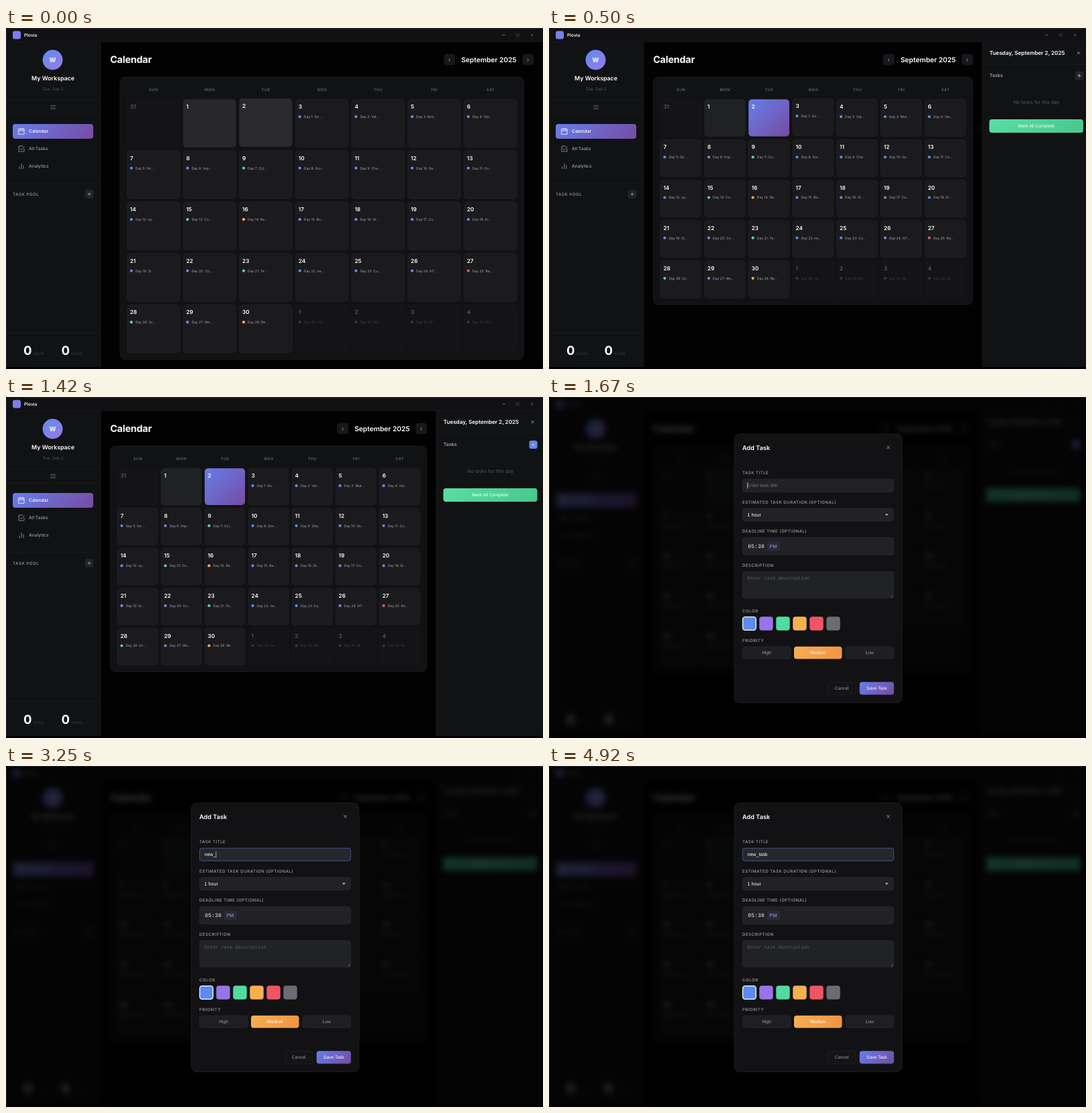
Animation of 800 by 508 pixels, one loop 5.16 s. Source, as an HTML page:

```html
<!DOCTYPE html>
<html lang="en">
<head>
<meta charset="utf-8">
<title>Task calendar</title>
<style>
  html, body { margin: 0; width: 100%; height: 100%; overflow: hidden; background: #000; }
  svg { display: block; width: 100%; height: 100%; }
  text { font-family: Inter, "Open Sans", sans-serif; text-rendering: geometricPrecision; white-space: pre; }
  text.ui { font-family: "Liberation Sans", Arial, sans-serif; }
  text.mono { font-family: "Liberation Mono", "DejaVu Sans Mono", monospace; }
  #blurred.dim { filter: blur(4px); }
</style>
</head>
<body>
<svg viewBox="0 0 800 508" preserveAspectRatio="none">
  <defs><clipPath id="stage"><rect width="800" height="505"/></clipPath></defs>
  <rect width="800" height="508" fill="#000"/>
  <g id="blurred">
    <g clip-path="url(#stage)">
      <rect y="20" width="800" height="485" fill="#020203"/>
      <g id="calendar"></g>
      <g id="panel"></g>
      <g id="sidebar"></g>
      <g id="titlebar"></g>
    </g>
  </g>
  <g id="modal" display="none"></g>
  <path d="M.5 505V7Q.5 .5 7 .5H800" fill="none" stroke="#242427"/>
</svg>
<script>
const LOOP = 5160, STEP = 1000 / 12;
const PANEL_W = 159, PANEL_START = 210, PANEL_TIME = 368, MODAL_AT = 1670;
const BLUE = '#5b8def', PURPLE = '#9775e8', GREEN = '#51dba0', ORANGE = '#f6b04f', RED = '#f05566';
const INDIGO = ['#667eea', '#764ba2'];
const MUTED = '#a1a1a7', FAINT = '#56565b', LINE = '#1f1f22';

const el = id => document.getElementById(id);
const clamp = v => Math.max(0, Math.min(1, v));
let gradients = 0;

function rect(x, y, w, h, r, fill, stroke, extra = '') {
  const edge = stroke ? `stroke="${stroke}" stroke-width=".6"` : '';
  return `<rect x="${x}" y="${y}" width="${w}" height="${h}" rx="${r}" fill="${fill}" ${edge} ${extra}/>`;
}

// Equivalent of a CSS linear-gradient(135deg, from, to)
function gradRect(x, y, w, h, r, [from, to], extra) {
  const id = 'g' + gradients++, d = (w + h) / 4, cx = x + w / 2, cy = y + h / 2;
  return `<linearGradient id="${id}" gradientUnits="userSpaceOnUse" x1="${cx - d}" y1="${cy - d}" x2="${cx + d}" y2="${cy + d}">
    <stop stop-color="${from}"/><stop offset="1" stop-color="${to}"/></linearGradient>` +
    rect(x, y, w, h, r, `url(#${id})`, null, extra);
}

function text(s, x, y, size, fill, { w = 400, a = 'start', ls = 0, c = '' } = {}) {
  return `<text x="${x}" y="${y}" font-size="${size}" fill="${fill}" font-weight="${w}" text-anchor="${a}" letter-spacing="${ls}" class="${c}">${s}</text>`;
}

const path = (d, stroke, width = .8) =>
  `<path d="${d}" fill="none" stroke="${stroke}" stroke-width="${width}" stroke-linecap="round" stroke-linejoin="round"/>`;
const hline = (x1, x2, y, color = LINE) => path(`M${x1} ${y}H${x2}`, color, .6);
const cross = (x, y, r, color) => path(`M${x - r} ${y - r}L${x + r} ${y + r}M${x + r} ${y - r}L${x - r} ${y + r}`, color);
const plus = (x, y, color) => path(`M${x - 2} ${y}H${x + 2}M${x} ${y - 2}V${y + 2}`, color);

// cubic-bezier(.4, 0, .2, 1)
function ease(x) {
  if (x <= 0 || x >= 1) return clamp(x);
  let lo = 0, hi = 1;
  for (let i = 0; i < 30; i++) {
    const s = (lo + hi) / 2, q = 1 - s;
    if (1.2 * q * q * s + .6 * q * s * s + s * s * s < x) lo = s; else hi = s;
  }
  return lo * lo * (3 - 2 * lo);
}

function drawTitlebar() {
  el('titlebar').innerHTML =
    rect(0, 0, 800, 20.5, 0, '#111113') + hline(0, 800, 20.5) +
    rect(10, 4.5, 12, 12, 3, '#7a80ea') +
    text('Plovia', 27, 12.8, 6.67, '#f4f4f5', { w: 600 }) +
    path('M739.5 10.5H743.5', '#88888c', .7) +
    path('M760.8 8.8H764.2V12.2H760.8Z', '#66666a', .5) +
    cross(783.5, 10.5, 1.4, '#77777b');
}

function drawSidebar() {
  const stat = (label, x) => text('0', x, 486.5, 18.5, '#fff', { w: 700 }) +
    text(label, x + 15, 486.5, 5.13, '#3a3a3e', { w: 500, ls: .5 });
  el('sidebar').innerHTML =
    rect(0, 20.5, 141, 490, 0, '#111214') + path('M141 20V508', LINE, .6) +
    gradRect(54.5, 32.5, 30, 30, 15, [BLUE, '#9b79e6']) +
    text('W', 69.5, 51, 9.6, '#fff', { w: 700, a: 'middle' }) +
    text('My Workspace', 70, 77.7, 8.8, '#fff', { w: 600, a: 'middle' }) +
    text('Tue, Sep 2', 70, 93, 6.1, FAINT, { a: 'middle' }) +
    [107.5, 128, 231.5, 454].map(y => hline(0, 141, y)).join('') +
    path('M66.5 115.5H73.5M66.5 118H73.5M66.5 120.5H73.5', '#77777b', .7) +
    gradRect(10, 143, 120, 22, 4, INDIGO) +
    path('M19 150.5H27V158.3H19ZM19 153H27M21.3 149V151.5M24.7 149V151.5', '#fff') +
    text('Calendar', 34, 156.4, 6.75, '#fff', { w: 500 }) +
    path('M27 180V184H19V176H25M21.2 179.6L23 181.5L27.4 176.8', MUTED) +
    text('All Tasks', 34, 182.4, 6.67, MUTED, { w: 500 }) +
    path('M20 207V209.5M23 202.5V209.5M26 205V209.5', MUTED) +
    text('Analytics', 34, 208.4, 6.67, MUTED, { w: 500 }) +
    text('TASK POOL', 10, 249.7, 6.15, '#8a8a8f', { w: 600, ls: .5 }) +
    rect(118, 241.5, 12, 12, 3, '#222327', '#2b2b2f') + plus(124, 247.5, MUTED) +
    stat('OPEN', 26) + stat('DONE', 82.5);
}

const TASKS = ('Go ,Val,Mut,Var,Go ,Imp,CLI,Gor,Cha,Se,Co,sy,Co,Re,Bu,St,Cu,Er,Si,Co,Te,ne,Cu,' +
  'HT,Re,Sc,Wo,Re,ne,Ro,Mi,Gr').split(',');
const DOTS = 'bbbbbpgbbbbbgopppbppgbbprgpobbbb';
const DOT_COLORS = { b: BLUE, p: PURPLE, g: GREEN, o: ORANGE, r: RED };

function drawCell(i, x, y, w, h, t) {
  const inMonth = i > 0 && i < 31, day = i === 0 ? 31 : inMonth ? i : i - 30, task = i - 3;
  const selected = i === 2 && t >= 250;
  let fill = '#1b1b1e', stroke = '#27272a';
  if (i === 1) fill = t < 250 ? '#28282c' : '#202124';
  if (i === 2) {
    if (t < 400) y -= 1;
    fill = '#2a2a2f';
  }
  if (i === 3) y -= clamp(1 - Math.abs(t - 505) / 170);
  let s = selected ? gradRect(x, y, w, h, 5, INDIGO) : rect(x, y, w, h, 5, fill, stroke);
  s += text(day, x + 4.5, y + 14, 8.2, '#fff', { w: 600 });
  if (task >= 0) {
    s += `<circle cx="${x + 6.5}" cy="${y + 26}" r="2.1" fill="${DOT_COLORS[DOTS[task]]}"/>` +
      text(`Day ${task + 1}: ${TASKS[task]}...`, x + 12.5, y + 27.9, 5.1, '#a9a9ae');
  }
  return `<g opacity="${inMonth ? 1 : .3}">${s}</g>`;
}

function drawCalendar(edge, t) {
  const avail = edge - 14.3 - 155.5, cardW = Math.min(601.5, avail);
  const cardX = 155.5 + (avail - cardW) / 2, gap = 4.9, pad = 10.4;
  const w = (cardW - 2 * pad - 6 * gap) / 7, h = w / 1.1;
  const navButton = (cx, s) => rect(cx - 8, 39, 16, 16, 4, '#17181b', '#1e1e21') +
    text(s, cx, 49.7, 8.2, '#b4b4b8', { a: 'middle' });
  let s = text('Calendar', 155.2, 52.1, 14.36, '#fff', { w: 700, ls: -.22 }) +
    navButton(edge - 139.3, '‹') + navButton(edge - 22.3, '›') +
    text('September 2025', edge - 80.6, 50.6, 10.2, '#fff', { w: 600, a: 'middle' }) +
    rect(cardX, 73, cardW, 43.4 + 5 * h + 4 * gap, 8, '#111214', '#222225');
  ['SUN', 'MON', 'TUE', 'WED', 'THU', 'FRI', 'SAT'].forEach((d, c) => {
    s += text(d, cardX + pad + c * (w + gap) + w / 2 + .3, 94.1, 5.7, '#626267', { w: 600, a: 'middle', ls: .5 });
  });
  for (let i = 0; i < 35; i++) {
    s += drawCell(i, cardX + pad + i % 7 * (w + gap), 106.2 + Math.floor(i / 7) * (h + gap), w, h, t);
  }
  el('calendar').innerHTML = s;
}

function drawPanel() {
  el('panel').innerHTML =
    rect(0, 20.5, PANEL_W + 2, 490, 0, '#111214') + path('M0 20V508', '#222225', .6) +
    text('Tuesday, September 2, 2025', 10.7, 40.4, 8.1, '#fff', { w: 600 }) +
    cross(143.5, 37.3, 1.7, '#b4b4b8') + hline(0, PANEL_W, 54.5) +
    text('Tasks', 10.7, 73.4, 7.1, MUTED, { w: 600 }) +
    rect(138.5, 65, 12, 12, 3, '#222327', '#2b2b2f') +
    rect(138.5, 65, 12, 12, 3, '#6285ea', null, 'id="hot"') + plus(144.5, 71, '#d4d4d8') +
    text('No tasks for this day', 80.6, 112.8, 7.1, FAINT, { a: 'middle' }) +
    gradRect(10.5, 136, 140, 20, 4, ['#58dfa2', '#48c78e']) +
    text('Mark All Complete', 80.5, 148.3, 6.67, '#fff', { a: 'middle', c: 'ui' });
}

function drawModal() {
  const field = (y, h) => rect(288.3, y, 225.4, h, 4, '#212226', '#2e2e32');
  const label = (s, y) => text(s, 288, y, 6.15, MUTED, { w: 500, ls: .48 });
  const button = (s, x, w, y, fill) => text(s, x + w / 2, y, 6.67, fill, { a: 'middle', c: 'ui' });
  const swatches = [BLUE, PURPLE, GREEN, ORANGE, RED, '#6b6b74'].map((c, i) =>
    rect(288.3 + i * 25, 327.3, 20.4, 20.4, 4, c)).join('');
  el('modal').innerHTML =
    rect(0, 0, 800, 508, 0, '#000', null, 'opacity=".77"') +
    rect(276, 55.3, 250, 400.4, 8, '#121214', '#2a2a2d') +
    text('Add Task', 288, 78.8, 9.2, '#fff', { w: 600 }) + cross(505.5, 75.2, 2, '#b4b4b8') +
    hline(276, 526, 95.7) +
    label('TASK TITLE', 115.3) + field(122.3, 19) +
    rect(288.3, 122.3, 225.4, 19, 4, '#27282c', '#667eea', 'id="focus"') +
    text('Enter task title', 295.4, 134.3, 7.18, '#747479', { c: 'ui' }).replace('<text', '<text id="hint"') +
    text('', 295.4, 134.3, 7.18, '#fff', { c: 'ui' }).replace('<text', '<text id="typed"') +
    rect(295.4, 127, .7, 9.5, 0, '#dcdce0', null, 'id="caret"') +
    label('ESTIMATED TASK DURATION (OPTIONAL)', 159) + field(166, 19) +
    text('1 hour', 295.6, 178, 7.18, '#fff', { c: 'ui' }) +
    '<path d="M500.6 174.3H505.8L503.2 177Z" fill="#b4b4b8"/>' +
    label('DEADLINE TIME (OPTIONAL)', 202.3) + field(209.3, 26) +
    text('05:38', 296.3, 225, 8.2, '#ececef', { c: 'mono' }) +
    rect(324.7, 215.8, 18.8, 13.2, 2, '#2a2a3c') +
    text('PM', 334.1, 224.8, 6.9, '#a3a1c2', { a: 'middle' }) +
    label('DESCRIPTION', 252.8) + field(260, 39.7) +
    text('Enter task description', 295.4, 271.5, 7, '#5c5c61', { c: 'mono' }) +
    path('M509.3 298.3L512.6 295M511.3 298.3L512.6 297', '#8a8a8f', .5) +
    label('COLOR', 320.5) + swatches +
    '<rect x="288.6" y="327.6" width="19.8" height="19.8" rx="3.6" fill="none" stroke="#fff" stroke-width="1.2"/>' +
    label('PRIORITY', 365) +
    rect(288.3, 372, 72, 18, 4, '#1e1f22', '#2c2c30') + button('High', 288, 72, 383.4, MUTED) +
    gradRect(365, 371.8, 71.5, 18.5, 4, ['#f6b055', '#f0923f']) + button('Medium', 365, 71.5, 383.4, '#fff') +
    rect(441.7, 372, 72, 18, 4, '#1e1f22', '#2c2c30') + button('Low', 441.7, 72, 383.4, MUTED) +
    hline(276, 526, 412.3) +
    rect(415.3, 424.7, 41.5, 18.6, 4, '#141416', '#29292c') + button('Cancel', 415.3, 41.5, 436.3, MUTED) +
    gradRect(462.7, 424.5, 51.2, 19, 4, INDIGO) + button('Save Task', 462.7, 51.2, 436.3, '#fff');
}

const WORD = 'new_task';
const KEYS = [2830, 3000, 3170, 3250, 3830, 4170, 4330, 4420];
const CARET = [[MODAL_AT, 2250], [2750, 3670], [3830, 4920]];

function updateModal(t) {
  const open = t >= MODAL_AT;
  el('modal').setAttribute('display', open ? 'inline' : 'none');
  el('blurred').classList.toggle('dim', open);
  if (!open) return;
  const typed = el('typed'), count = KEYS.filter(k => t >= k).length;
  typed.textContent = WORD.slice(0, count);
  el('hint').setAttribute('opacity', count ? 0 : 1);
  el('focus').setAttribute('opacity', clamp((t - MODAL_AT - 5) / 330) * .85);
  const caret = el('caret');
  caret.setAttribute('x', 295.4 + (count ? typed.getComputedTextLength() : 0));
  caret.setAttribute('opacity', CARET.some(([a, b]) => t >= a && t < b) ? 1 : 0);
}

let lastStep = -1, lastView = '';

function render(now) {
  const step = Math.floor((now % LOOP + 4) / STEP);
  if (step === lastStep) return;
  lastStep = step;
  const t = step * STEP + 5;
  const edge = 800 - PANEL_W * ease((t - 5 - PANEL_START) / PANEL_TIME);
  const view = t < 1000 ? String(step) : 'settled';
  if (view !== lastView) {
    drawCalendar(edge, t);
    lastView = view;
  }
  el('panel').setAttribute('transform', `translate(${edge} 0)`);
  const hover = clamp((t - 1165) / 250) * (1 - clamp((t - MODAL_AT - 5) / 400));
  el('hot').setAttribute('opacity', hover);
  updateModal(t);
}

drawTitlebar();
drawSidebar();
drawPanel();
drawModal();
const start = performance.now();
function tick() {
  render(performance.now() - start);
  requestAnimationFrame(tick);
}
tick();
</script>
</body>
</html>
```
